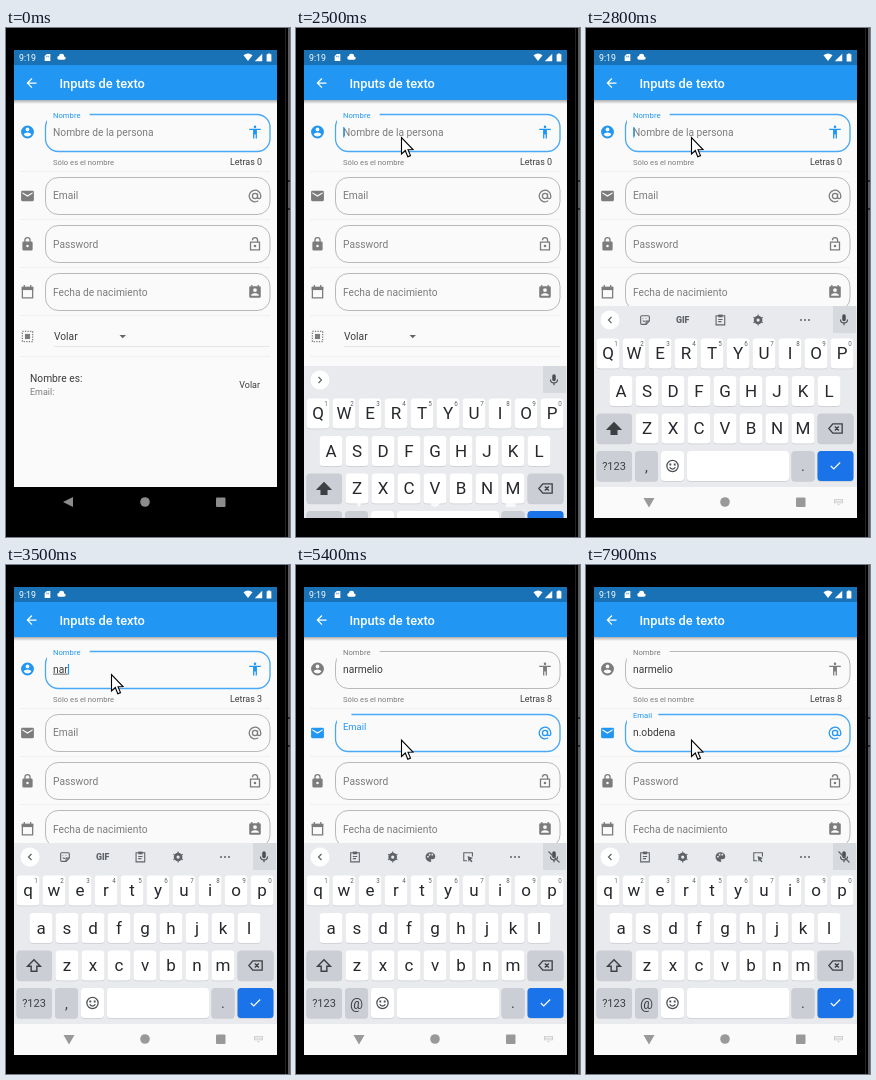
An HTML page with a canvas that plays this animation: 284x509 px, repeating every 8 s.

```html
<!DOCTYPE html>
<html lang="es">
<head>
<meta charset="utf-8">
<style>
html, body { margin: 0; width: 100%; height: 100%; overflow: hidden; background: #000; }
canvas { display: block; width: 284px; height: 509px; filter: blur(0.35px); }
</style>
</head>
<body>
<canvas id="stage"></canvas>
<script>
const W = 284, H = 509, LOOP = 8000, TICK = 100;
const BLUE = '#2196f3', GRAY = '#7c7c7c', INK = '#3c3c3c', KEY_INK = '#26282b', TOOL = '#5f6368';
const NAME = 'narmelio', MAIL = 'n.obdena';
const NAME_KEYS = [[3100, 1], [3300, 2], [3500, 3], [3800, 4], [3900, 5], [4200, 8]];
const MAIL_KEYS = [[6000, 1], [6500, 2], [6700, 3], [6900, 4], [7000, 5], [7100, 6], [7300, 7], [7400, 8]];

const canvas = document.getElementById('stage');
const c = canvas.getContext('2d');
const dpr = window.devicePixelRatio || 1;
canvas.width = W * dpr;
canvas.height = H * dpr;

// Icons live on a 24-unit grid: f = filled, s = stroked.
const ICONS = {
  back: { f: 'M20 11H7.8l5.6-5.6L12 4l-8 8 8 8 1.4-1.4L7.8 13H20z' },
  person: { f: 'M12 2a10 10 0 1 0 0 20a10 10 0 0 0 0-20zm0 3a3 3 0 1 1 0 6a3 3 0 0 1 0-6zm0 14.2a7.2 7.2 0 0 1-6-3.2c0-2 4-3.1 6-3.1s6 1.1 6 3.1a7.2 7.2 0 0 1-6 3.2z' },
  mail: { f: 'M4 4h16a2 2 0 0 1 2 2v12a2 2 0 0 1-2 2H4a2 2 0 0 1-2-2V6a2 2 0 0 1 2-2zm16 4V6l-8 5-8-5v2l8 5z' },
  lock: { f: 'M6 8h12a2 2 0 0 1 2 2v10a2 2 0 0 1-2 2H6a2 2 0 0 1-2-2V10a2 2 0 0 1 2-2zm6 5a2 2 0 1 0 0 4a2 2 0 0 0 0-4z', s: 'M8 9V6a4 4 0 0 1 8 0v3' },
  unlock: { f: 'M12 13a2 2 0 1 0 0 4a2 2 0 0 0 0-4z', s: 'M5 9h14v12H5zM8 6a4 4 0 0 1 8 0v3' },
  calendar: { f: 'M3 4h18v5H3z', s: 'M4 5h16v16H4zM7 1v4M17 1v4' },
  select: { f: 'M8 8h8v8H8z', s: 'M4 4h16v16H4z', dash: [2, 2] },
  body: { f: 'M12 2a2 2 0 1 0 0 4a2 2 0 0 0 0-4zM21 7v2h-6v13h-2v-6h-2v6H9V9H3V7z' },
  at: { s: 'M16 8v5.5a2.5 2.5 0 0 0 5 0V12a9 9 0 1 0-4 7.5M16 12a4 4 0 1 0-8 0a4 4 0 0 0 8 0' },
  contact: { f: 'M5 3h14a2 2 0 0 1 2 2v14a2 2 0 0 1-2 2H5a2 2 0 0 1-2-2V5a2 2 0 0 1 2-2zm7 3a3 3 0 1 0 0 6a3 3 0 0 0 0-6zm6 12v-1c0-2-4-3-6-3s-6 1-6 3v1z', s: 'M7 1v3M17 1v3' },
  sticker: { s: 'M6 4h12a2 2 0 0 1 2 2v8l-6 6H6a2 2 0 0 1-2-2V6a2 2 0 0 1 2-2zM14 20v-6h6M8 9v1M14 9v1M8 13a3 3 0 0 0 4 1' },
  clipboard: { f: 'M8 2h8v5H8z', s: 'M4 4h16v17H4zM8 11h8M8 15h6' },
  gear: { f: 'M12 4a8 8 0 1 0 0 16a8 8 0 0 0 0-16zm0 5a3 3 0 1 1 0 6a3 3 0 0 1 0-6z', s: 'M12 2v3M12 19v3M3.3 7l2.7 1.5M18 15.5l2.7 1.5M20.7 7l-2.7 1.5M6 15.5l-2.7 1.5' },
  palette: { f: 'M12 3a9 9 0 0 0 0 18c2 0 2-2 1-3s0-2 1-2h2c3 0 5-2 5-5c0-5-4-8-9-8zM6 10h3v3H6zM9 6h3v3H9zM14 6h3v3h-3z' },
  touch: { f: 'M11 10l10 4-4 2 3 4-2 2-3-4-2 3z', s: 'M10 19H4V4h16v7' },
  mic: { f: 'M12 2a3 3 0 0 1 3 3v6a3 3 0 0 1-6 0V5a3 3 0 0 1 3-3z', s: 'M6 11a6 6 0 0 0 12 0M12 17v4' },
  shift: { s: 'M12 4l-9 9h5v7h8v-7h5z' },
  erase: { s: 'M8 5h14v14H8l-6-7zM11 9l6 6M17 9l-6 6' },
  smile: { f: 'M7 8h3v3H7zM14 8h3v3h-3z', s: 'M12 3a9 9 0 1 0 0 18a9 9 0 0 0 0-18zM7.5 14a5 5 0 0 0 9 0' },
  check: { s: 'M4 12l5 5L20 6' },
  board: { f: 'M2 5h20v10H2zM9 17h6l-3 3zM4 7v2h16V7zM4 11v2h16v-2z' },
  cloud: { f: 'M6 19a5 5 0 0 1-1-10a7 7 0 0 1 14 1a4.5 4.5 0 0 1 0 9z' },
  sd: { f: 'M10 2h10v20H4V8zM9 7v4h2V7zM13 7v4h2V7z' },
  wifi: { f: 'M12 21L0 6q12-9 24 0z' },
  signal: { f: 'M2 22h20V2z' },
  battery: { f: 'M9 2h6v2h3v18H6V4h3z' }
};
for (const icon of Object.values(ICONS)) {
  icon.fill = icon.f && new Path2D(icon.f);
  icon.line = icon.s && new Path2D(icon.s);
}

function icon(name, x, y, size, color, solid) {
  const { fill, line, dash } = ICONS[name];
  c.save();
  c.translate(x - size / 2, y - size / 2);
  c.scale(size / 24, size / 24);
  c.fillStyle = c.strokeStyle = color;
  c.lineWidth = 2;
  if (fill) c.fill(fill, 'evenodd');
  if (line) {
    c.setLineDash(dash || []);
    c.stroke(line);
    if (solid) c.fill(line);
  }
  c.restore();
}

function text(str, x, y, size, color, weight = 400, align = 'left') {
  c.font = `${weight} ${size}px Roboto, sans-serif`;
  c.textAlign = align;
  c.fillStyle = color;
  c.fillText(str, x, y);
}

function widthOf(str, size) {
  c.font = `400 ${size}px Roboto, sans-serif`;
  return c.measureText(str).width;
}

function rect(x, y, w, h, color) {
  c.fillStyle = color;
  c.fillRect(x, y, w, h);
}

function round(x, y, w, h, r, color) {
  c.beginPath();
  c.roundRect(x, y, w, h, r);
  c.fillStyle = color;
  c.fill();
}

function poly(points, color) {
  c.beginPath();
  points.forEach(([x, y]) => c.lineTo(x, y));
  c.closePath();
  c.fillStyle = color;
  c.fill();
}

const mix = (a, b, p) => a + (b - a) * p;
const progress = (t, from, to) => Math.min(1, Math.max(0, (t - from) / (to - from)));
const within = (t, from, to) => t >= from && t < to;
const typed = (t, keys) => keys.reduce((n, [at, count]) => t >= at ? count : n, 0);

function outline(y, focused, gapEnd) {
  c.save();
  if (gapEnd) {
    c.beginPath();
    c.rect(0, 0, W, H);
    c.rect(41, y - 3, gapEnd - 41, 12);
    c.clip('evenodd');
  }
  c.beginPath();
  c.roundRect(39.5, y + 0.5, 224.5, 37, 12.8);
  c.strokeStyle = focused ? '#4aa8f5' : '#a8a8a8';
  c.lineWidth = focused ? 1.3 : 0.8;
  c.stroke();
  c.restore();
}

function entry(str, baseline, caret, underline) {
  text(str, 47, baseline, 10.24, INK);
  const end = 47 + widthOf(str, 10.24);
  if (underline) rect(47, baseline + 1.2, widthOf(str.slice(0, underline), 10.24), 0.8, INK);
  if (caret) rect(end + 0.2, baseline - 8.5, 1.2, 10.5, BLUE);
}

function statusAndTitle() {
  rect(8, 22, 263, 15, '#1971b6');
  rect(8, 37, 263, 35, BLUE);
  const shadow = c.createLinearGradient(0, 72, 0, 76);
  shadow.addColorStop(0, 'rgba(0,0,0,0.3)');
  shadow.addColorStop(1, 'rgba(0,0,0,0)');
  rect(8, 72, 263, 4, shadow);
  text('9:19', 13, 33, 8.8, '#fff');
  icon('sd', 41.5, 29.5, 8.5, '#fff');
  icon('cloud', 55.5, 29.2, 8.8, '#fff');
  icon('wifi', 242, 29.5, 9, '#fff');
  icon('signal', 252.5, 29.5, 9, '#fff');
  icon('battery', 263, 29.5, 9.5, '#fff');
  icon('back', 25.5, 55, 15, '#fff');
  text('Inputs de texto', 53.5, 59.5, 12.8, '#fff', 500);
}

function form(t) {
  rect(8, 72, 263, 387, '#fafafa');
  for (const y of [143, 191, 239, 287, 328]) rect(14, y, 250, 0.7, '#ececec');

  const onMail = t >= 5400;
  const nameTint = onMail ? GRAY : BLUE, mailTint = onMail ? BLUE : GRAY;
  const count = typed(t, NAME_KEYS), mailCount = typed(t, MAIL_KEYS);
  const nameCaret = !onMail && t >= 400 && !within(t, 900, 1300) && !within(t, 2300, 2500);

  icon('person', 21.5, 104, 15.4, nameTint);
  outline(86, !onMail, 47 + widthOf('Nombre', 10.24));
  text('Nombre', 47, 89.5, 7.68, nameTint);
  if (!count) text('Nombre de la persona', 47, 107.5, 10.24, GRAY);
  const underline = onMail ? 0 : within(t, 4200, 4400) ? 7 : count;
  entry(NAME.slice(0, count), 107.5, nameCaret, underline);
  icon('body', 249, 104, 15.4, nameTint);
  text('Sólo es el nombre', 47, 137, 7.68, GRAY);
  text('Letras ' + count, 256, 137, 8.96, INK, 400, 'right');

  const lift = progress(t, 5300, 5600);
  icon('mail', 21.5, 168, 15.4, mailTint);
  outline(149, onMail, onMail && 47 + widthOf('Email', 10.24) * lift);
  text('Email', 47, mix(171.3, 152.7, lift), mix(10.24, 7.68, lift), mailTint);
  const mailCaret = t >= 5500 && t < 7900;
  entry(MAIL.slice(0, mailCount), 171, mailCaret, mailCount === 1 ? 1 : 0);
  icon('at', 249, 168, 15.4, mailTint);

  const rows = [['lock', 'Password', 'unlock', 216], ['calendar', 'Fecha de nacimiento', 'contact', 264]];
  for (const [left, label, right, y] of rows) {
    icon(left, 21.5, y, 15.4, GRAY);
    outline(y - 19, false);
    text(label, 47, y + 3.5, 10.24, GRAY);
    icon(right, 249, y, 15.4, GRAY);
  }

  icon('select', 21.5, 308.5, 15.4, GRAY);
  text('Volar', 48, 312, 10.24, INK);
  poly([[113.5, 307], [120, 307], [116.75, 310.3]], '#666');
  rect(48, 318, 216, 0.7, '#dedede');
  text('Nombre es:', 24, 354, 10.24, INK);
  text('Email:', 24, 367, 8.96, GRAY);
  text('Volar', 254, 360, 8.96, INK, 400, 'right');
}

function navBar(light, color) {
  poly(light ? [[57.5, 470], [68.5, 470], [63, 479.5]] : [[57, 474], [67, 469], [67, 479]], color);
  c.beginPath();
  c.arc(139, 474, 4.8, 0, Math.PI * 2);
  c.fill();
  round(210, 469.5, 9.5, 9.5, 1, color);
}

function toolbar(t) {
  const open = t >= 2700 && !within(t, 4700, 5400) && !within(t, 6300, 6700);
  const onMail = t >= 5400;
  rect(247, 278, 23, 27, '#d6d9de');
  c.beginPath();
  c.arc(24, 292, 9.5, 0, Math.PI * 2);
  c.fillStyle = '#fff';
  c.fill();
  const d = open ? -1.5 : 1.5;
  c.beginPath();
  c.moveTo(24 - d, 289);
  c.lineTo(24 + d, 292);
  c.lineTo(24 - d, 295);
  c.strokeStyle = TOOL;
  c.lineWidth = 1.2;
  c.stroke();
  if (open) {
    const tools = onMail ? ['clipboard', 'gear', 'palette', 'touch'] : ['sticker', 'GIF', 'clipboard', 'gear'];
    tools.forEach((tool, i) => {
      const x = 59 + i * 37.7;
      if (tool === 'GIF') text(tool, x, 295, 8.8, TOOL, 900, 'center');
      else icon(tool, x, 292, 13, TOOL);
    });
    for (let i = 0; i < 3; i++) round(214 + i * 4, 291, 2, 2, 1, TOOL);
  }
  icon('mic', 258, 292, 14, '#4a4d51');
  if (onMail) {
    c.beginPath();
    c.moveTo(252.5, 286.5);
    c.lineTo(263.5, 297.5);
    c.stroke();
  }
}

function key(x, y, w, color) {
  round(x, y + 0.8, w, 30, 3.5, '#c9ccd1');
  round(x, y, w, 30, 3.5, color);
}

function keyboard(t) {
  const drop = t < 2800 ? 60 * Math.exp((2500 - t) / 80) : 0;
  const caps = t < 3100, dark = '#cbced4';
  c.save();
  c.beginPath();
  c.rect(8, 72, 263, 418);
  c.clip();
  c.translate(0, drop);
  rect(8, 278, 263, 181, '#e8eaed');
  rect(8, 459, 263, 31, '#fafafa');
  toolbar(t);

  const rows = ['qwertyuiop', 'asdfghjkl', 'zxcvbnm'];
  rows.forEach((row, r) => [...row].forEach((letter, i) => {
    const x = [22, 35, 61][r] + i * 26, y = 310.5 + r * 37.5;
    key(x - 11.5, y, 23, '#fff');
    text(caps ? letter.toUpperCase() : letter, x, y + 20.5, 17, KEY_INK, 400, 'center');
    if (!r) text((i + 1) % 10, x + 8, y + 7.5, 6.3, TOOL, 400, 'center');
  }));

  key(10.5, 385.5, 35.5, dark);
  icon('shift', 28, 400.5, 17, '#3c4043', caps);
  key(231.5, 385.5, 36, dark);
  icon('erase', 249.5, 400.5, 16, '#3c4043');

  key(10.5, 423, 35.5, dark);
  text('?123', 28, 442, 11, '#3c4043', 400, 'center');
  key(49, 423, 23, dark);
  text(t >= 5400 ? '@' : ',', 60.5, 443.5, 14.5, '#3c4043', 400, 'center');
  key(75, 423, 23, '#fff');
  icon('smile', 86.5, 438, 15, '#4c5054');
  key(101, 423, 102, '#fff');
  key(205.5, 423, 23, dark);
  text('.', 217, 443, 14.5, '#3c4043', 400, 'center');
  key(231.5, 423, 36, '#1a73e8');
  icon('check', 249.5, 438, 14, '#fff');
  c.restore();

  if (t < 2700) {
    navBar(true, 'rgba(255,255,255,0.75)');
  } else {
    navBar(true, '#999');
    icon('board', 252.5, 474, 10.5, '#c6c6c6');
  }
}

function pointer(t) {
  if (t < 100) return;
  const enter = progress(t, 0, 700), down = progress(t, 4600, 5100);
  const ease = enter * (2 - enter);
  const x = mix(127, 105.5, ease);
  const y = mix(-12, 109.5, ease) + 65.5 * down * down * (3 - 2 * down);
  const shape = [[0, 0], [0, 16.5], [3.8, 13], [6.3, 19.3], [9, 18.1], [6.5, 12.2], [11.5, 12]];
  c.save();
  c.translate(x, y);
  poly(shape, '#fff');
  c.strokeStyle = '#000';
  c.lineWidth = 1.1;
  c.stroke();
  c.restore();
}

function device() {
  rect(0, 0, W, H, '#000');
  rect(279, 0, 1, H, '#222');
  rect(282, 0, 2, H, '#5c5c5c');
  rect(282, 152, 2, 2, '#222');
  rect(282, 180, 2, 2, '#222');
}

function draw(t) {
  c.setTransform(dpr, 0, 0, dpr, 0, 0);
  device();
  form(t);
  statusAndTitle();
  rect(8, 459, 263, 31, '#000');
  if (t >= 2500) keyboard(t);
  else navBar(false, '#8c8c8c');
  pointer(t);
}

const start = performance.now();
function frame() {
  const t = (performance.now() - start) % LOOP;
  draw(Math.floor(t / TICK) * TICK);
  requestAnimationFrame(frame);
}
frame();
</script>
</body>
</html>
```
